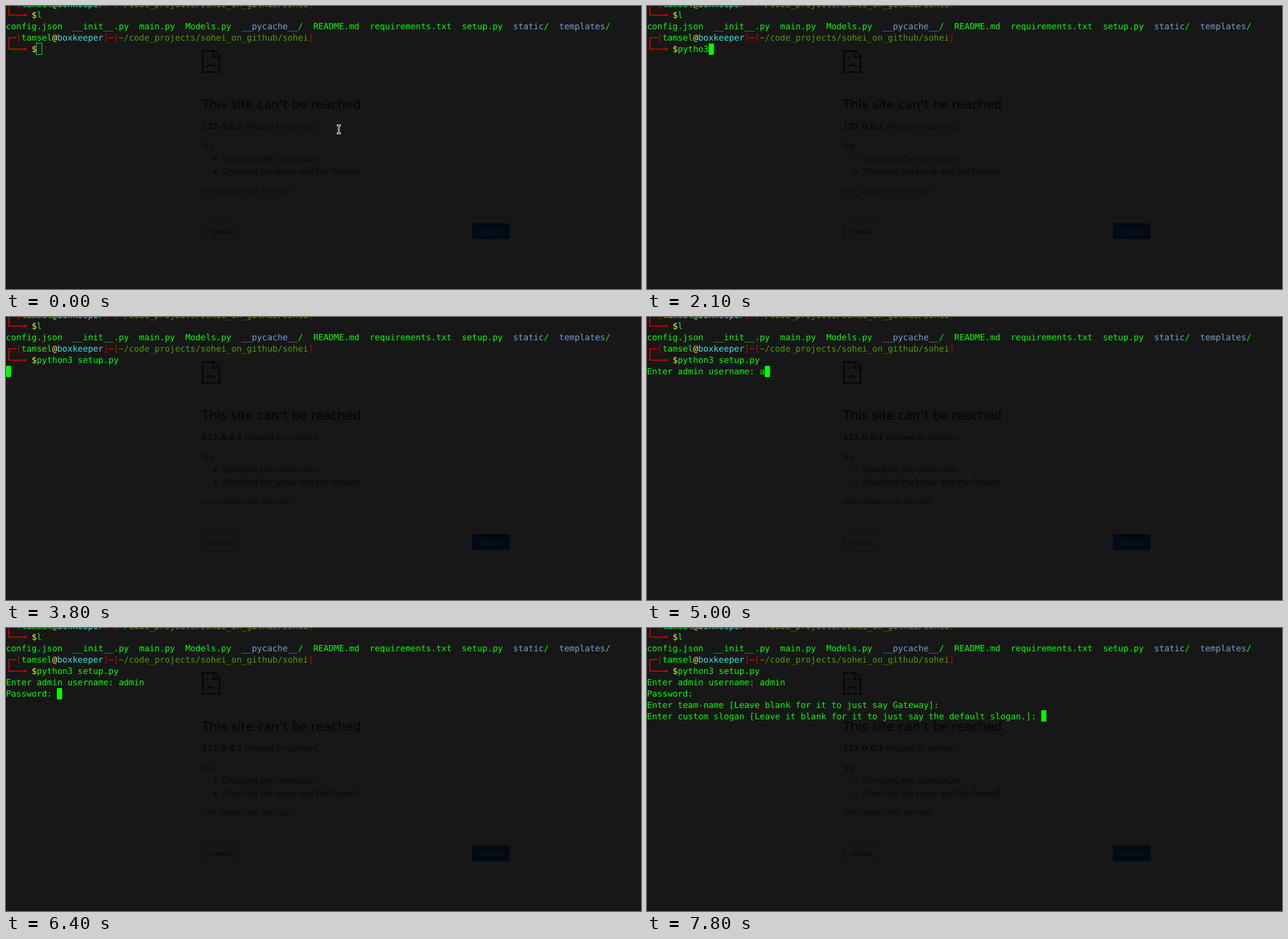
An HTML page with a canvas that plays this animation: 1121x499 px, repeating every 8 s.

```html
<!DOCTYPE html>
<html lang="en">
<head>
<meta charset="utf-8">
<title>Terminal setup</title>
<style>
  html, body { margin: 0; width: 100%; height: 100%; overflow: hidden; background: #171717; }
  canvas { display: block; }
</style>
</head>
<body>
<canvas id="stage" width="1121" height="499"></canvas>
<script>
const ctx = document.getElementById('stage').getContext('2d');
const LOOP = 8000;
const CELL = 9.042, LINE = 19.9, FIRST_TOP = 6.2;
const GREEN = '#00ff00', RED = '#cc0000', YELLOW = '#fce94f', CYAN = '#34e2e2',
      PATH = '#4e9a06', BLUE = '#729fcf';
const PAGE = '#171717', INK = '#090909', HEADING = '#030303', LINK = '#020a15';
const SANS = '"DejaVu Sans", sans-serif', ARIAL = '"Liberation Sans", sans-serif';

const lineTop = row => FIRST_TOP + row * LINE;

function rect(color, x, y, w, h) {
  ctx.fillStyle = color;
  ctx.fillRect(x, y, w, h);
}

function label(text, x, y, size, color = INK, family = SANS, weight = 'normal') {
  ctx.font = `${weight} ${size}px ${family}`;
  ctx.fillStyle = color;
  ctx.fillText(text, x, y);
}

function button(x, y, w, h) {
  ctx.beginPath();
  ctx.roundRect(x, y, w, h, 3.6);
}

// ---- the browser page showing through the terminal ----

function drawSadPage() {
  const unit = 2.68;
  const block = (col, row, w = 1, h = 1) =>
    rect('#060606', 346 + col * unit, 78 + row * unit, w * unit, h * unit);
  block(0, 0, 9);
  block(0, 0, 1, 14.8);
  block(0, 13.8, 12);
  block(11, 4, 1, 10.8);
  block(7, 0, 1, 5);
  block(7, 4, 5);
  for (let i = 1; i < 4; i++) block(8 + i, i);
  block(3, 4);
  block(4, 9.4, 4);
  block(3, 10.4);
  block(8, 10.4);
}

function drawPage() {
  rect(PAGE, 0, 0, 1121, 499);
  drawSadPage();
  label('This site can’t be reached', 346, 181, 21.7, HEADING);
  label('127.0.0.1', 346, 217, 13.56, INK, SANS, 'bold');
  label('refused to connect.', 422, 217, 13.56);
  label('Try:', 346, 252, 13.56);
  label('Checking the connection', 382, 274, 13.56);
  label('Checking the proxy and the firewall', 382, 296, 13.56, LINK);
  for (const y of [270, 292]) {
    ctx.beginPath();
    ctx.arc(369, y, 2.4, 0, 2 * Math.PI);
    ctx.fillStyle = INK;
    ctx.fill();
  }
  label('ERR_CONNECTION_REFUSED', 346, 330, 10.85);

  button(346.5, 383.5, 65, 29);
  ctx.strokeStyle = '#0f0f0f';
  ctx.lineWidth = 1;
  ctx.stroke();
  label('Details', 361, 402, 11.75, INK, ARIAL);
  button(822.5, 383, 66.5, 28);
  ctx.fillStyle = LINK;
  ctx.fill();
  label('Reload', 837, 401.5, 11.75, PAGE, ARIAL);
}

// ---- the terminal ----

// Writes [text, color] runs on the character grid.
function write(row, col, ...runs) {
  const baseline = Math.round(lineTop(row) + 15.2);
  ctx.font = '15.07px "DejaVu Sans Mono", monospace';
  for (const [text, color = GREEN] of runs) {
    ctx.fillStyle = color;
    for (const char of text) ctx.fillText(char, col++ * CELL, baseline);
  }
}

function drawPrompt(row) {
  const y = Math.round(lineTop(row) + LINE / 2);
  rect(RED, 4, y - 1, 2 * CELL - 4, 2);
  rect(RED, 4, y - 1, 2, 21);
  rect(RED, 20 * CELL, y - 1, CELL, 2);
  rect(RED, 4, y + 19, 3.5 * CELL - 4, 2);
  rect(RED, 3.5 * CELL, y + 18, CELL / 2, 4);
  write(row, 2, ['[', RED], ['tamsel'], ['@', YELLOW], ['boxkeeper', CYAN], [']', RED]);
  write(row, 21, ['[', RED], ['~/code_projects/sohei_on_github/sohei', PATH], [']', RED]);
  write(row + 1, 5, ['$', YELLOW]);
}

function drawHistory() {
  drawPrompt(-1);
  write(0, 6, ['l']);
  write(1, 0, ['config.json  __init__.py  main.py  Models.py  '], ['__pycache__', BLUE],
    ['/  README.md  requirements.txt  setup.py  '], ['static', BLUE], ['/  '],
    ['templates', BLUE], ['/']);
  drawPrompt(2);
}

function drawCursor(row, col, style) {
  if (style === 'off') return;
  const x = Math.round(col * CELL), right = Math.round((col + 1) * CELL);
  const y = Math.round(lineTop(row)), bottom = Math.round(lineTop(row + 1));
  if (style === 'solid') return rect(GREEN, x, y, right - x, bottom - y);
  ctx.strokeStyle = GREEN;
  ctx.lineWidth = 1;
  ctx.strokeRect(x - 0.5, y - 0.5, right - x + 1, bottom - y);
}

// [time, text from the prompt on, cursor style]
const command = 'python3 setup.py';
const askUser = command + '\nEnter admin username: ';
const askPassword = askUser + 'admin\nPassword: ';
const askTeam = askPassword + '\nEnter team-name [Leave blank for it to just say Gateway]: ';
const askSlogan = askTeam +
  '\nEnter custom slogan [Leave it blank for it to just say the default slogan.]: ';
const session = [
  [0, '', 'hollow'], [400, ''], [1000, '', 'off'],
  [1200, 'p'], [1500, 'py'], [1600, 'pyt'], [1700, 'pyth'], [1900, 'pytho'],
  [2100, 'pytho3'], [2300, 'pytho'], [2800, 'python3 '],
  [3100, 'python3 s'], [3200, 'python3 se'], [3300, 'python3 set'],
  [3600, command + ' '], [3800, command + '\n'],
  [4400, askUser, 'off'], [5000, askUser + 'a'], [5200, askUser + 'ad'],
  [5300, askUser + 'adm'], [5400, askUser + 'admin'],
  [5700, askPassword], [6200, askPassword, 'off'], [6400, askPassword],
  [7000, askTeam], [7600, askTeam, 'off'], [7800, askSlogan],
];

// [time, x, y]; the pointer hides once typing starts
const pointerPath = [[0, 584, 209], [100, 588, 204], [200, 591, 199]];
const POINTER_HIDES = 1200;

const latest = (steps, time) => steps.findLast(([start]) => start <= time);

function drawSession(time) {
  const [, text, cursor = 'solid'] = latest(session, time);
  const lines = text.split('\n');
  const indent = i => i === 0 ? 6 : 0;
  lines.forEach((line, i) => write(3 + i, indent(i), [line]));
  const last = lines.length - 1;
  drawCursor(3 + last, indent(last) + lines[last].length, cursor);
}

function drawPointer(time) {
  if (time >= POINTER_HIDES) return;
  const [, x, y] = latest(pointerPath, time);
  const part = (color, dx, dy, w, h) => rect(color, x + dx, y + dy, w, h);
  part('#fff', 0, 0, 7, 3);
  part('#fff', 0, 14, 7, 3);
  part('#fff', 2, 0, 3, 17);
  part('#000', 1, 1, 5, 1);
  part('#000', 1, 15, 5, 1);
  part('#000', 3, 1, 1, 15);
}

function draw() {
  const time = performance.now() % LOOP;
  ctx.textRendering = 'geometricPrecision';
  drawPage();
  drawHistory();
  drawSession(time);
  drawPointer(time);
  requestAnimationFrame(draw);
}
draw();
</script>
</body>
</html>
```
